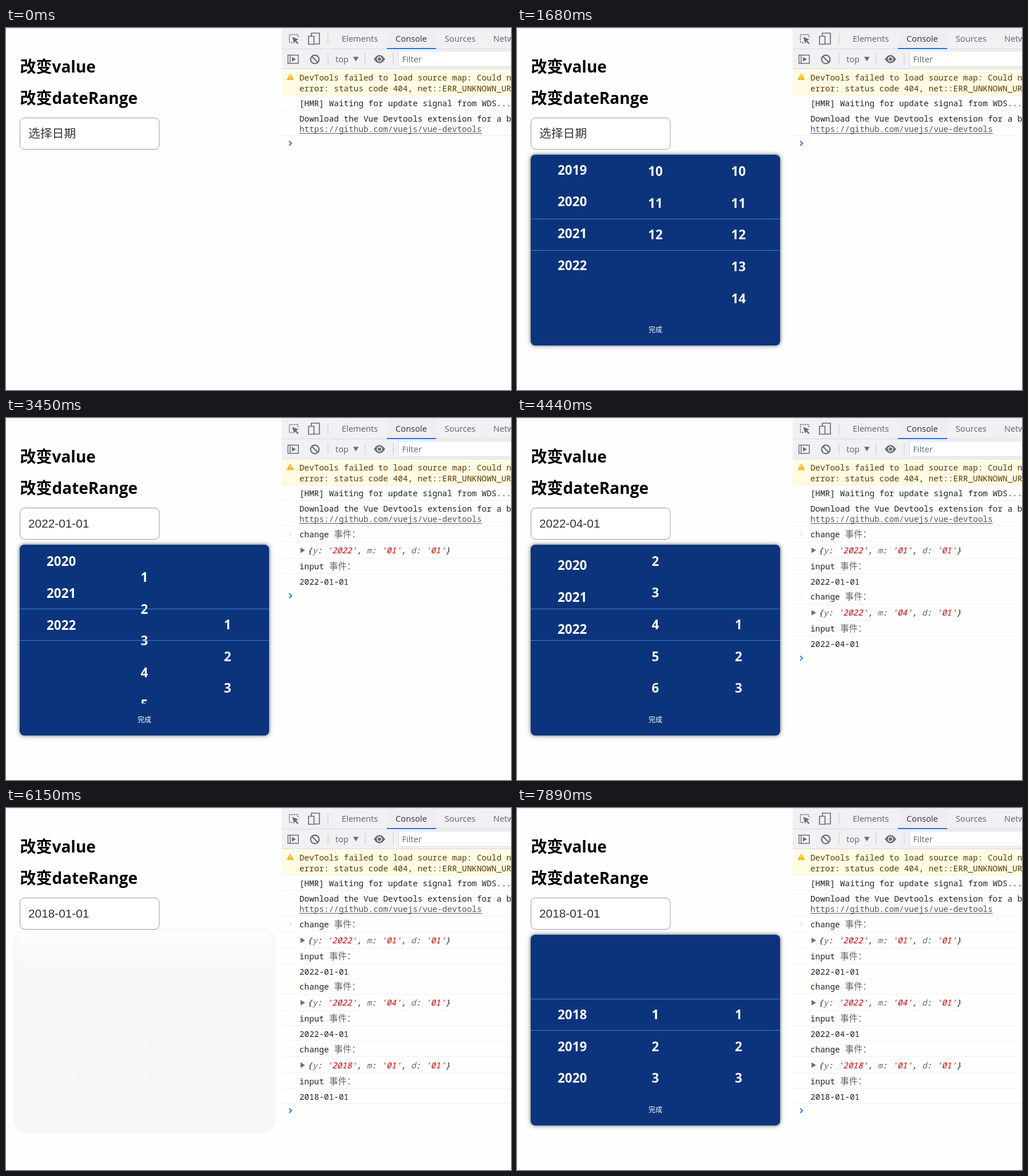
An HTML page for the animation above (8000 ms loop, 883 px wide and 634 px high).

```html
<!DOCTYPE html>
<html lang="zh">
<head>
<meta charset="utf-8">
<style>
html, body { margin: 0; width: 100%; height: 100%; overflow: hidden; background: #fefefe; }
svg { position: absolute; left: 0; top: 0; }
text { white-space: pre; }
.head { font: bold 28px "Open Sans", "Noto Sans CJK SC", sans-serif; }
.field { font: 20.8px "Liberation Sans", "Noto Sans CJK SC", sans-serif; fill: #333; }
.ui { font: 14.7px "Open Sans", sans-serif; fill: #5f6368; }
.mono { font: 14.37px "Noto Sans Mono", "Noto Sans CJK SC", monospace; fill: #222; }
.zh { font: 300 15.4px "Noto Sans CJK SC", sans-serif; fill: #666; }
.obj { font-style: italic; }
.key { fill: #666; }
.str { fill: #c80000; }
.ghost { font: bold 22.4px "Open Sans", sans-serif; text-anchor: middle; }
#picker { position: absolute; left: 24px; top: 222px; width: 436px; overflow: hidden; border-radius: 8px;
  background: #0c347c; color: #fff; box-shadow: 0 0 6px rgba(0, 0, 0, .65); }
#wheels { position: absolute; width: 436px; height: 278.3px; overflow: hidden; }
.wheel { position: absolute; top: 1px; width: 145.33px; text-align: center;
  font: bold 22.4px/55.67px "Open Sans", sans-serif; }
.wheel div { height: 55.67px; }
.rule { position: absolute; width: 100%; height: 1px; background: #2a8ad0; }
#done { position: absolute; top: 296px; width: 100%; text-align: center;
  font: 12px/20px "Noto Sans CJK SC", sans-serif; }
</style>
</head>
<body>
<svg id="page" width="883" height="634"></svg>
<div id="picker">
  <div id="wheels"></div>
  <div class="rule" style="top:112px"></div>
  <div class="rule" style="top:167px"></div>
  <div id="done">完成</div>
</div>
<script>
const LOOP = 8000, ROW = 55.67, LOG = 109.3, FULL = 334;
const $ = id => document.getElementById(id);
const text = (x, y, cls, s) => `<text x="${x}" y="${y}" class="${cls}">${s}</text>`;
const rect = (x, y, w, h, fill, extra = '') =>
  `<rect x="${x}" y="${y}" width="${w}" height="${h}" fill="${fill}" ${extra}/>`;
const path = (d, stroke, width = 1, extra = '') =>
  `<path d="${d}" fill="none" stroke="${stroke}" stroke-width="${width}" ${extra}/>`;
const shape = (d, fill) => `<path d="${d}" fill="${fill}"/>`;
const rule = (y, color = '#f0f0f0') => rect(482, y, 401, 1, color);
const chevron = (color, y) => path(`M495 ${y - 4}l4.2 4l-4.2 4`, color, 2);
const GREY = '#6a6e73';

const picks = [
  { at: 2070, y: '2022', m: '01', d: '01' },
  { at: 3600, y: '2022', m: '04', d: '01' },
  { at: 4860, y: '2018', m: '01', d: '01' }
];

function logGroup({ y, m, d }, i) {
  const pair = (k, v) => `<tspan class="key">${k}</tspan>: <tspan class="str">'${v}'</tspan>`;
  return `<g id="log${i}" transform="translate(0 ${LOG * i})">` +
    chevron(i ? '#fffad2' : '#e9e9e9', 202.5) +
    text(513, 209, 'mono', 'change') + text(573.5, 209, 'zh', '事件：') + rule(216) +
    shape('M515 227v9.5l8-4.75z', '#6e6e6e') +
    text(527, 237, 'mono obj', `{${pair('y', y)}, ${pair('m', m)}, ${pair('d', d)}}`) + rule(245) +
    text(513, 265, 'mono', 'input') + text(565, 265, 'zh', '事件：') + rule(272) +
    text(513, 292, 'mono', `${y}-${m}-${d}`) + rule(298, i < 2 ? '#fbf8e4' : '#f0f0f0') + '</g>';
}

function ghostText() {
  return ['2018', '2019', '2020'].map((year, i) => {
    const y = 371 + i * ROW;
    return `<text x="97" y="${y}" class="ghost" fill="#fafaf9">${year}</text>` +
      `<text x="242" y="${y}" class="ghost" fill="#fcfcee">${i + 1}</text>`;
  }).join('');
}

const devtools =
  rect(482, 1, 401, 71, '#f1f0f3') + rect(666, 2, 86, 34, '#eeedf1') +
  rule(36, '#cfdde2') + rect(666, 35, 86, 2, '#1a73e8') + rule(71, '#d8dbe2') +
  [[563, 9], [563, 44], [628, 44], [677, 44]].map(([x, y]) => rect(x - .5, y, 1, 20, '#c8cacf')).join('') +
  // inspect and device icons
  path('M501 25.5h-4q-1.5 0-1.5-1.5v-11q0-1.5 1.5-1.5h12q1.5 0 1.5 1.5v3', GREY, 1.5, 'stroke-dasharray="3 1.2"') +
  shape('M500.5 15.5l11 4.5l-4.3 1.8l4.4 4.6l-1.8 1.8l-4.5-4.6l-1.6 4.2z', GREY) +
  path('M534 14v-5h14v19h-9M529 14.5h9.5v14h-9.5z', GREY, 1.7) +
  // sidebar, clear, dropdown and eye icons
  path('M493 47.5h18.2v14.5h-18.2zM496.8 47.5v14.5', GREY, 1.5) + shape('M500 50.8v8l7-4z', GREY) +
  `<circle cx="540" cy="55" r="7.4" fill="none" stroke="${GREY}" stroke-width="2.2"/>` +
  path('M534.8 49.8l10.4 10.4', GREY, 2.2) + shape('M607 50.5h9.5l-4.75 8z', GREY) +
  shape('M643 54.5q10-14.5 20 0q-10 14.5-20 0z', GREY) +
  '<circle cx="653" cy="54.5" r="3.8" fill="none" stroke="#f1f0f3" stroke-width="1.7"/>' +
  rect(686.5, 40.5, 220, 27, '#fff', 'stroke="#dcdde0"') +
  text(587, 24, 'ui', 'Elements') + text(681, 24, 'ui" style="fill:#333', 'Console') +
  text(767, 24, 'ui', 'Sources') + text(852, 24, 'ui', 'Network') +
  text(576, 60, 'ui', 'top') + text(692.5, 60, 'ui', 'Filter') +
  // console messages
  rect(482, 72, 401, 45, '#fffbe5') + rule(117, '#fff5c8') +
  shape('M497 79.5l6.3 11.5h-12.6z', '#f4b400') + rect(496.3, 83, 1.5, 4, '#fff') + rect(496.3, 88, 1.5, 1.5, '#fff') +
  text(513, 92, 'mono" style="fill:#5c3c00', 'DevTools failed to load source map: Could not') +
  text(513, 111, 'mono" style="fill:#5c3c00', 'error: status code 404, net::ERR_UNKNOWN_URL') +
  text(513, 137, 'mono', '[HMR] Waiting for update signal from WDS...') + rule(144) +
  text(513, 164, 'mono', 'Download the Vue Devtools extension for a better') +
  text(513, 182, 'mono" style="fill:#545454', 'https://github.com/vuejs/vue-devtools') +
  rect(513, 184, 319, 1, '#545454') + rule(188);

const ghost = rect(12, 210, 460, 359, '#f7f7f7', 'rx="24"') + rect(14, 212, 456, 66, '#f9f9f9', 'rx="20"') +
  rect(21, 218, 443, 19, '#fcfcfc', 'rx="9"') + ghostText();

$('page').innerHTML =
  rect(0, 0, 883, 634, '#fefefe') + rect(0, 0, 883, 1, '#e2e2e4') +
  text(24.5, 78, 'head', '改变value') + text(24.5, 133, 'head', '改变dateRange') +
  `<rect id="halo"/><g id="ghost">${ghost}</g>` +
  rect(24.5, 157.5, 243.5, 55, '#fff', 'rx="8" id="box"') +
  '<text id="value" x="39" y="192" class="field"></text>' +
  rect(0, 174, 1.2, 23, '#222', 'id="caret"') +
  devtools + picks.map(logGroup).join('') + `<g id="prompt">${chevron('#2b7de9', 202)}</g>`;

const wheels = [[2018, 5], [1, 12], [1, 31]].map(([first, count], i) => {
  const el = document.createElement('div');
  el.className = 'wheel';
  el.style.left = i * 145.33 + 'px';
  el.innerHTML = Array.from({ length: count }, (_, k) => `<div>${first + k}</div>`).join('');
  $('wheels').append(el);
  return { el, first };
});

function bezier(x1, y1, x2, y2) {
  const at = (a, b, s) => 3 * a * s * (1 - s) ** 2 + 3 * b * s * s * (1 - s) + s ** 3;
  return u => {
    if (u <= 0) return 0;
    if (u >= 1) return 1;
    let lo = 0, hi = 1;
    for (let i = 0; i < 20; i++) {
      const mid = (lo + hi) / 2;
      if (at(x1, x2, mid) < u) lo = mid; else hi = mid;
    }
    return at(y1, y2, lo);
  };
}
const ease = bezier(.25, .1, .25, 1), swipe = bezier(.3, .2, .5, 1);
const show = (id, on) => { $(id).style.display = on ? '' : 'none'; };
const within = (t, a, b) => t >= a && t < b;

function render(t) {
  const fade = start => ease((t - start) / 300);
  const slide = (start, end) => swipe((t - start) / (end - start));
  const open = t < 5780 ? fade(737) : t < 6690 ? 1 - fade(5780) : fade(6865);
  const count = picks.filter(p => t >= p.at).length;

  // wheels: the dragged column slides, the others reset at once
  const year = 2021 + slide(1650, 2370) - 4 * slide(4410, 5160);
  const month = count === 0 ? 12 : count === 3 ? 1 : 1 + 3 * slide(3180, 3900);
  const day = count ? 1 : 12;
  [year, month, day].forEach((v, i) => {
    wheels[i].el.style.transform = `translateY(${(2 - v + wheels[i].first) * ROW}px)`;
  });

  const height = FULL * open;
  Object.assign($('picker').style, { height: height + 'px', opacity: open, display: open > 0 ? '' : 'none' });
  const pad = open < 1 ? 12 : 9;
  $('halo').setAttribute('style', `x:${24 - pad}px;y:${222 - pad}px;width:${436 + 2 * pad}px;` +
    `height:${height + 2 * pad}px;rx:${pad + 8}px;fill:${open < 1 ? '#f8f8f8' : '#fbfbfb'}`);
  show('halo', open > 0);
  show('ghost', t >= 5780 && open < 1);

  const focused = within(t, 720, 1680) || within(t, 6690, 7890);
  $('box').setAttribute('stroke', focused ? '#5aaef0' : '#999');
  $('caret').setAttribute('x', t < 5000 ? 39 : 134);
  show('caret', within(t, 720, 1170) || within(t, 6690, 7530));

  const last = picks[count - 1];
  $('value').textContent = last ? `${last.y}-${last.m}-${last.d}` : '选择日期';
  picks.forEach((p, i) => show('log' + i, i < count));
  $('prompt').setAttribute('transform', `translate(0 ${LOG * count})`);
}

const start = performance.now();
function tick() {
  render((performance.now() - start) % LOOP);
  requestAnimationFrame(tick);
}
tick();
</script>
</body>
</html>
```
